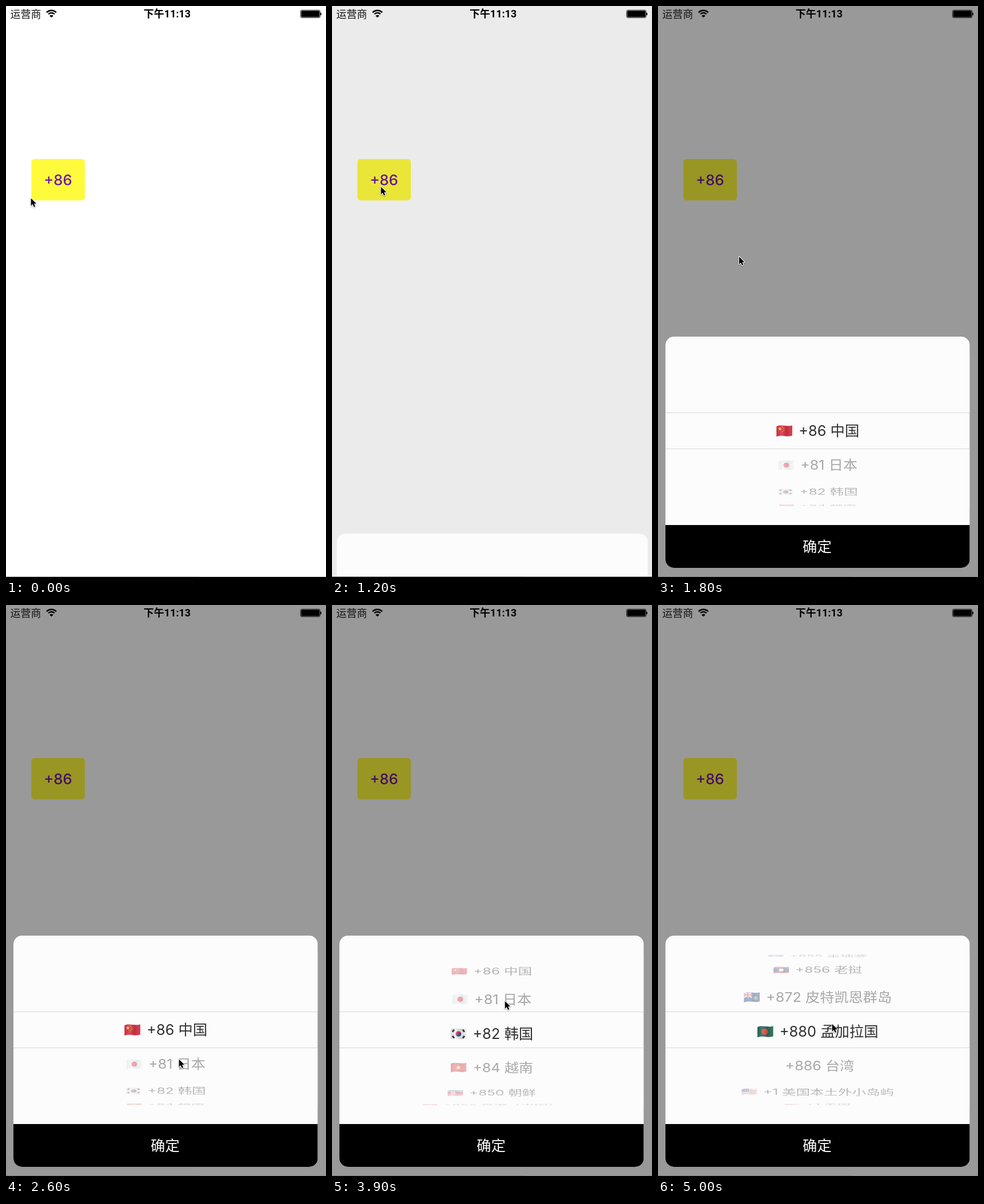
Recreate the animation shown at these times as an HTML page with a canvas. Size 560x1000 px, loop 5.1 s.

```html
<!DOCTYPE html>
<html lang="zh-CN">
<head>
<meta charset="utf-8">
<title>Country code picker</title>
<style>
html, body { margin: 0; width: 100%; height: 100%; overflow: hidden; background: #fff; }
canvas { display: block; }
</style>
</head>
<body>
<canvas id="stage" width="560" height="1000"></canvas>
<script>
const ctx = document.getElementById('stage').getContext('2d');
const LOOP = 5100, STEP = 100;
const FONT = 'Inter, "Noto Sans CJK SC", "Noto Sans CJK", sans-serif';
const CLOCK_FONT = 'Roboto, "Noto Sans CJK SC", "Noto Sans CJK", sans-serif';
const TAU = Math.PI * 2;

// Wheel geometry
const RADIUS = 132, ROW_ANGLE = 27 * Math.PI / 180;
const PANEL = { x: 13, y: 579, w: 532.6, h: 405 };
const WHEEL_Y = 165;   // wheel centre below the panel top
const BAND = 32;       // half height of the selected band

// time, x, y
const POINTER = [
  [0, 43, 336], [200, 46, 339], [800, 84, 319], [1100, 85, 316], [1500, 85, 316],
  [2400, 302, 793], [2600, 302, 795], [3000, 305, 846], [3300, 323, 847],
  [3600, 306, 815], [3900, 302, 693], [4100, 302, 645], [4500, 304, 728], [5000, 304, 733]
];
// time, row at the centre
const SPIN = [
  [0, 0], [3650, 0], [3900, 1.89], [4200, 5.3], [4500, 8.32], [4750, 9.5], [5000, 9.95]
];

const clamp = v => Math.max(0, Math.min(1, v));

function slope(keys, i, c) {
  if (i === 0 || i === keys.length - 1) return 0;
  const d = j => (keys[j + 1][c] - keys[j][c]) / (keys[j + 1][0] - keys[j][0]);
  const a = d(i - 1), b = d(i);
  return a * b > 0 ? 2 * a * b / (a + b) : 0;
}

// Smooth path through the keys without overshoot
function along(keys, t, c = 1) {
  const last = keys.length - 1;
  if (t >= keys[last][0]) return keys[last][c];
  let i = 0;
  while (t >= keys[i + 1][0]) i++;
  const a = keys[i], b = keys[i + 1], span = b[0] - a[0], u = (t - a[0]) / span;
  const ease = u * u * (3 - 2 * u);
  return a[c] + (b[c] - a[c]) * ease
    + span * u * (1 - u) * ((1 - u) * slope(keys, i, c) - u * slope(keys, i + 1, c));
}

function box(color, x, y, w, h) {
  ctx.fillStyle = color;
  ctx.fillRect(x, y, w, h);
}

function roundBox(color, x, y, w, h, r) {
  ctx.fillStyle = color;
  ctx.beginPath();
  ctx.roundRect(x, y, w, h, r);
  ctx.fill();
}

function disc(color, x, y, r, from = 0, to = TAU) {
  ctx.fillStyle = color;
  ctx.beginPath();
  ctx.arc(x, y, r, from, to);
  ctx.fill();
}

function star(color, x, y, r) {
  ctx.fillStyle = color;
  ctx.beginPath();
  for (let i = 0; i < 10; i++) {
    const a = i * TAU / 10 - TAU / 4, q = i % 2 ? r * 0.4 : r;
    ctx.lineTo(x + q * Math.cos(a), y + q * Math.sin(a));
  }
  ctx.fill();
}

function line(color, width, ...p) {
  ctx.strokeStyle = color;
  ctx.lineWidth = width;
  ctx.beginPath();
  for (let i = 0; i < p.length; i += 2) ctx.lineTo(p[i], p[i + 1]);
  ctx.stroke();
}

function text(str, x, y, size, color, weight = 400, align = 'center', font = FONT) {
  ctx.font = `${weight} ${size}px ${font}`;
  ctx.textAlign = align;
  ctx.fillStyle = color;
  ctx.fillText(str, x, y);
}

// Flags fill a 28 x 21 cell
const field = color => box(color, 0, 0, 28, 21);

function bands(...colors) {
  const h = 21 / colors.length;
  colors.forEach((c, i) => box(c, 0, i * h, 28, h + 0.2));
}

function stateFlag() {
  bands(...Array.from({ length: 9 }, (_, i) => i % 2 ? '#f6f2f2' : '#cf3745'));
  box('#3b4f88', 0, 0, 13, 11);
  for (let i = 0; i < 9; i++) disc('#fff', 2.5 + i % 3 * 4, 2.8 + Math.floor(i / 3) * 3, 0.7);
}

const flags = {
  cn() {
    field('#d63545');
    star('#f8d648', 6, 7, 3.6);
    [[11, 3.5], [13, 6], [13, 9], [11, 11.5]].forEach(([x, y]) => disc('#f8d648', x, y, 0.8));
  },
  jp() { field('#ececec'); disc('#d1284b', 14, 10.5, 5); },
  kr() {
    field('#ececec');
    disc('#d23a4c', 14, 10.5, 4.8, Math.PI, TAU);
    disc('#27509b', 14, 10.5, 4.8, 0, Math.PI);
    disc('#d23a4c', 11.7, 10.5, 2.3);
    disc('#27509b', 16.3, 10.5, 2.3);
    for (const x of [5, 23]) for (const y of [5, 16]) {
      const s = (x < 14) === (y < 10) ? -1 : 1;
      line('#333', 3, x - 1.5, y - 2 * s, x + 1.5, y + 2 * s);
    }
  },
  vn() { field('#d63545'); star('#f9e04b', 14, 10.5, 5.6); },
  kp() {
    field('#33599b');
    box('#f1f1f1', 0, 3.5, 28, 14);
    box('#d5303f', 0, 5, 28, 11);
    disc('#fff', 10, 10.5, 4);
    star('#d5303f', 10, 10.5, 3.8);
  },
  hk() { field('#d63545'); star('#fff', 14, 10.5, 6); },
  mo() { field('#56625f'); disc('#e4e6e2', 14, 11, 4.5); disc('#d8cf9a', 14, 4.5, 1); },
  kh() {
    field('#33539b');
    box('#d8303c', 0, 5, 28, 11);
    box('#fff', 9, 11, 10, 3);
    for (const x of [10, 13, 16]) box('#fff', x, 8, 2, 4);
  },
  la() {
    field('#c92f3c');
    box('#273b76', 0, 5, 28, 11);
    disc('#fff', 14, 10.5, 4.2);
  },
  pn() {
    field('#29417f');
    line('#eee', 2.4, 0, 0, 14, 11);
    line('#eee', 2.4, 14, 0, 0, 11);
    box('#eee', 5.2, 0, 3.6, 11);
    box('#eee', 0, 3.8, 14, 3.6);
    box('#d0364a', 6, 0, 2, 11);
    box('#d0364a', 0, 4.6, 14, 2);
    disc('#4d9a7a', 20.5, 12, 3.6);
    disc('#e0c25a', 20.5, 11, 1.4);
  },
  bd() { field('#2c6b5a'); disc('#e0504a', 13, 10.5, 5.6); },
  um: stateFlag,
  us: stateFlag
};

const rows = [
  ['cn', '+86 中国'], ['jp', '+81 日本'], ['kr', '+82 韩国'], ['vn', '+84 越南'],
  ['kp', '+850 朝鲜'], ['hk', '+852 香港［中国］'], ['mo', '+853 澳门［中国］'],
  ['kh', '+855 柬埔寨'], ['la', '+856 老挝'], ['pn', '+872 皮特凯恩群岛'],
  ['bd', '+880 孟加拉国'], ['', '+886 台湾'], ['um', '+1 美国本土外小岛屿'], ['us', '+1 美国']
];

function drawFlag(name, x, y) {
  ctx.save();
  ctx.translate(x, y);
  ctx.beginPath();
  ctx.moveTo(0, 2.5);
  ctx.bezierCurveTo(9, -2, 18, 4, 28, 0.8);
  ctx.lineTo(28, 18.5);
  ctx.bezierCurveTo(19, 22, 10, 16.5, 0, 20.5);
  ctx.closePath();
  ctx.clip();
  flags[name]();
  const shade = ctx.createLinearGradient(0, 0, 28, 0);
  shade.addColorStop(0, 'rgba(0,0,0,.05)');
  shade.addColorStop(0.3, 'rgba(255,255,255,.12)');
  shade.addColorStop(0.65, 'rgba(0,0,0,.12)');
  shade.addColorStop(1, 'rgba(255,255,255,.05)');
  field(shade);
  ctx.restore();
}

function drawRow([flag, label], angle, cx, cy) {
  const depth = Math.cos(angle), scale = 1 - 0.08 * (1 - depth);
  const lead = flag ? 39.5 : 7;
  ctx.save();
  ctx.translate(cx, cy + RADIUS * Math.sin(angle));
  ctx.scale(scale, scale * depth);
  ctx.font = `400 25.4px ${FONT}`;
  const left = -(lead + ctx.measureText(label).width) / 2;
  if (flag) drawFlag(flag, left + 0.5, -10.3);
  text(label, left + lead, 9.2, 25.4, '#303030', 400, 'left');
  ctx.restore();
}

// Fades everything outside the selected band
function drawVeil(x, cy, dir) {
  const near = cy + dir * BAND, far = cy + dir * 134;
  const g = ctx.createLinearGradient(0, near, 0, far);
  g.addColorStop(0, 'rgba(252,252,252,.55)');
  g.addColorStop(0.7, 'rgba(252,252,252,.64)');
  g.addColorStop(1, 'rgba(252,252,252,.84)');
  box(g, x, Math.min(near, far), PANEL.w, 102);
}

function drawWheel(x, cy, pos) {
  const cx = x + PANEL.w / 2 + 0.2;
  ctx.save();
  ctx.beginPath();
  ctx.rect(x, cy - 133, PANEL.w, 266);
  ctx.clip();
  rows.forEach((row, i) => {
    const angle = (i - pos) * ROW_ANGLE;
    if (Math.abs(angle) < TAU / 4) drawRow(row, angle, cx, cy);
  });
  drawVeil(x, cy, -1);
  drawVeil(x, cy, 1);
  ctx.restore();
  box('#d8d8d8', x, cy - BAND, PANEL.w, 1);
  box('#d8d8d8', x, cy + BAND - 1, PANEL.w, 1);
}

function drawPanel(t) {
  const left = 1 - clamp((t - 1170) / 315), rest = left * left;
  const drop = Math.round(421 * rest), spread = rest / 0.344;
  const x = PANEL.x - 2 * spread, y = PANEL.y + drop, w = PANEL.w + 5 * spread;
  ctx.save();
  ctx.beginPath();
  ctx.roundRect(x, y, w, PANEL.h, 15);
  ctx.clip();
  box('#fcfcfc', x, y, w, PANEL.h);
  drawWheel(x, y + WHEEL_Y, along(SPIN, t));
  box('#000', x, y + 330, w, 75);
  text('确定', x + 265.5, y + 377, 25.4, '#fff');
  ctx.restore();
}

function drawButton() {
  roundBox('#fefa3c', 44.4, 268, 93.6, 72.4, 5.5);
  text('+86', 91, 313.6, 25.8, '#6d18a8', 500);
}

function drawStatus() {
  text('运营商', 7.5, 20.7, 18, '#111', 400, 'left');
  text('下午11:13', 282, 20.4, 18, '#000', 600, 'center', CLOCK_FONT);
  ctx.strokeStyle = '#000';
  ctx.lineWidth = 2.4;
  for (const r of [7.3, 11.6]) {
    ctx.beginPath();
    ctx.arc(79.5, 19.3, r, -Math.PI * 0.76, -Math.PI * 0.24);
    ctx.stroke();
  }
  ctx.fillStyle = '#000';
  ctx.beginPath();
  ctx.moveTo(79.5, 20.3);
  ctx.arc(79.5, 20.3, 4.6, -Math.PI * 0.76, -Math.PI * 0.24);
  ctx.fill();
  ctx.lineWidth = 0.8;
  ctx.beginPath();
  ctx.roundRect(515.4, 7.2, 34.4, 13.4, 2.5);
  ctx.stroke();
  roundBox('#000', 516.5, 8.2, 32.2, 11.4, 1.5);
  roundBox('#000', 550, 11.5, 2, 5, [0, 2, 2, 0]);
}

function drawPointer(x, y) {
  ctx.save();
  ctx.translate(x + 0.7, y + 0.7);
  ctx.beginPath();
  [[0, 0], [0, 13.2], [3, 10.4], [5.2, 15.3], [7.5, 14.3], [5.4, 9.6], [9.4, 9.4]]
    .forEach(p => ctx.lineTo(...p));
  ctx.closePath();
  ctx.lineJoin = 'round';
  ctx.strokeStyle = '#fff';
  ctx.lineWidth = 2;
  ctx.shadowColor = 'rgba(0,0,0,.35)';
  ctx.shadowBlur = 2;
  ctx.shadowOffsetY = 1;
  ctx.stroke();
  ctx.shadowColor = 'transparent';
  ctx.fillStyle = '#000';
  ctx.fill();
  ctx.restore();
}

function draw(t) {
  box('#fff', 0, 0, 560, 1000);
  drawButton();
  const dim = 0.4 * clamp((t - 1170) / 150);
  if (dim > 0) {
    box(`rgba(0,0,0,${dim})`, 0, 0, 560, 1000);
    drawPanel(t);
  }
  box(t < 700 ? '#a8a8a8' : '#808080', 0, 999, 338, 1);
  box(t < 700 ? '#c4c4c4' : '#8c8c8c', 338, 999, 222, 1);
  drawStatus();
  drawPointer(along(POINTER, t, 1), along(POINTER, t, 2));
}

const start = performance.now();
function tick() {
  const t = (performance.now() - start) % LOOP;
  draw(Math.floor(t / STEP) * STEP);
  requestAnimationFrame(tick);
}
tick();
</script>
</body>
</html>
```
